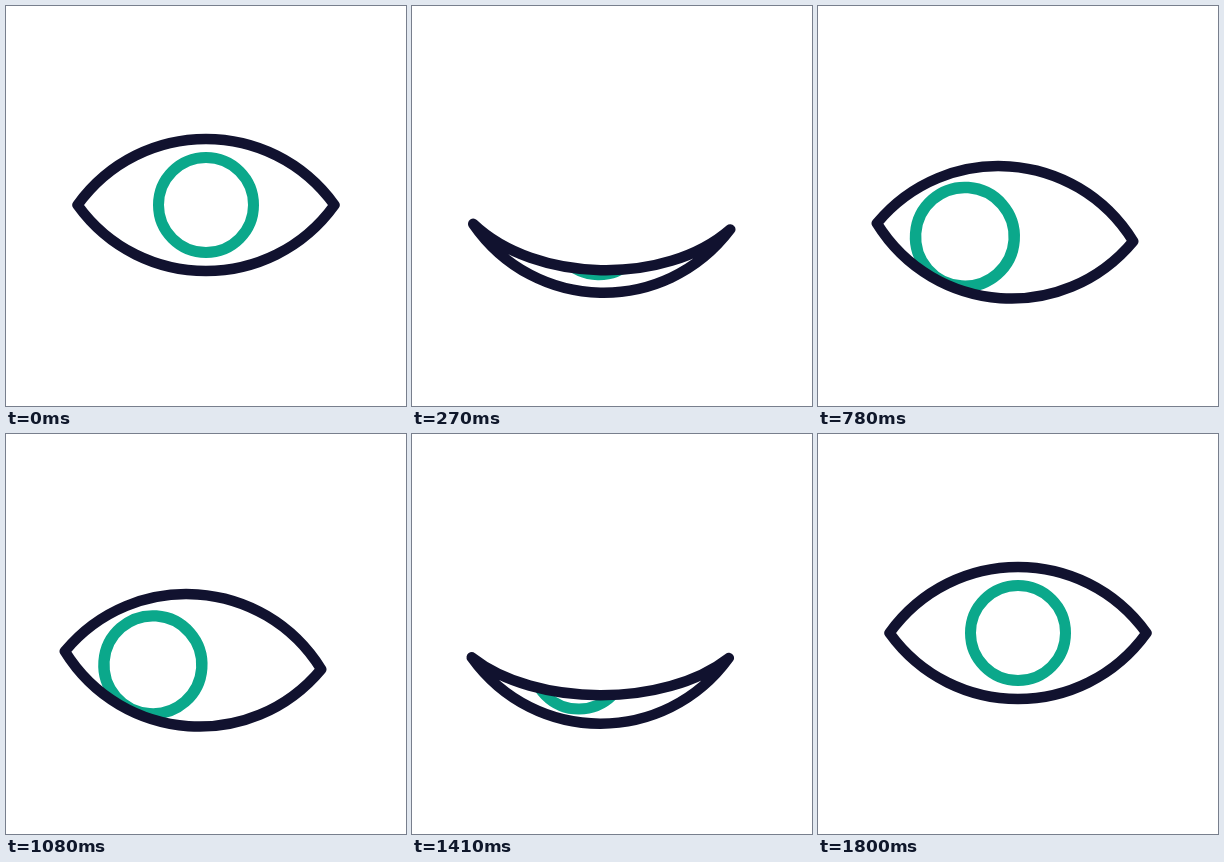
An HTML page for the animation above (1.89 s loop, 400 px wide and 400 px high).

```html
<!DOCTYPE html>
<html lang="en">
<head>
<meta charset="utf-8">
<title>Blinking eye</title>
<style>
  html, body { margin: 0; width: 100%; height: 100%; overflow: hidden; background: #fff; }
  svg { display: block; width: 100vw; height: 100vh; }
</style>
</head>
<body>
<svg viewBox="0 0 400 400" fill="none">
  <clipPath id="opening"><path id="mask"/></clipPath>
  <g id="eye">
    <g clip-path="url(#opening)">
      <circle id="iris" r="47.5" stroke="#0ba88b" stroke-width="11"/>
    </g>
    <path id="lids" stroke="#11122f" stroke-width="10.5" stroke-linejoin="round"/>
  </g>
</svg>
<script>
const LOOP = 1890, STEP = 30, HALF = 128.5, OPEN = 66;
const [eye, iris, lids, mask] = ['eye', 'iris', 'lids', 'mask'].map(id => document.getElementById(id));

const easeIn = u => u * u;
const easeOut = u => u * (2 - u);
const easeBoth = u => (1 - Math.cos(Math.PI * u)) / 2;
const progress = (t, from, to) => Math.min(1, Math.max(0, (t - from) / (to - from)));

// 0 = centred, 1 = looking aside
const aside = (t, a, b, c, d) => easeBoth(progress(t, a, b)) - easeBoth(progress(t, c, d));

// [end time, upper lid height, easing]
const lidKeys = [
  [75, 73, easeOut], [288, -OPEN, easeIn], [525, 67, easeOut], [750, OPEN, easeBoth],
  [1110, OPEN, easeBoth], [1384, -OPEN, easeIn], [1620, 71, easeOut], [1800, OPEN, easeBoth]
];

function lidHeight(t) {
  let start = 0, height = OPEN;
  for (const [end, next, ease] of lidKeys) {
    if (t < end) return height + (next - height) * ease(progress(t, start, end));
    [start, height] = [end, next];
  }
  return height;
}

function draw(now) {
  const t = Math.floor(now % LOOP / STEP) * STEP;
  const shift = aside(t, 60, 360, 1350, 1650);
  const tilt = aside(t, 180, 420, 1200, 1440);
  const gaze = aside(t, 225, 480, 1300, 1530);
  const pulse = 1 + 0.045 * Math.sin(Math.PI * progress(t, 530, 1260));

  const curve = (side, h) => `C${-65 * side} ${-4 / 3 * h} ${65 * side} ${-4 / 3 * h} ${HALF * side} 0`;
  const outline = `M${-HALF} 0${curve(1, lidHeight(t))}${curve(-1, -OPEN)}Z`;
  lids.setAttribute('d', outline);
  mask.setAttribute('d', outline);
  eye.setAttribute('transform', `translate(${200 - 13 * shift} ${199 + 27.3 * shift}) rotate(${4 * tilt})`);
  iris.setAttribute('transform', `translate(${-39.7 * gaze} ${7.3 * gaze}) scale(${pulse})`);
}

const begin = performance.now();
function tick() {
  draw(performance.now() - begin);
  requestAnimationFrame(tick);
}
tick();
</script>
</body>
</html>
```
